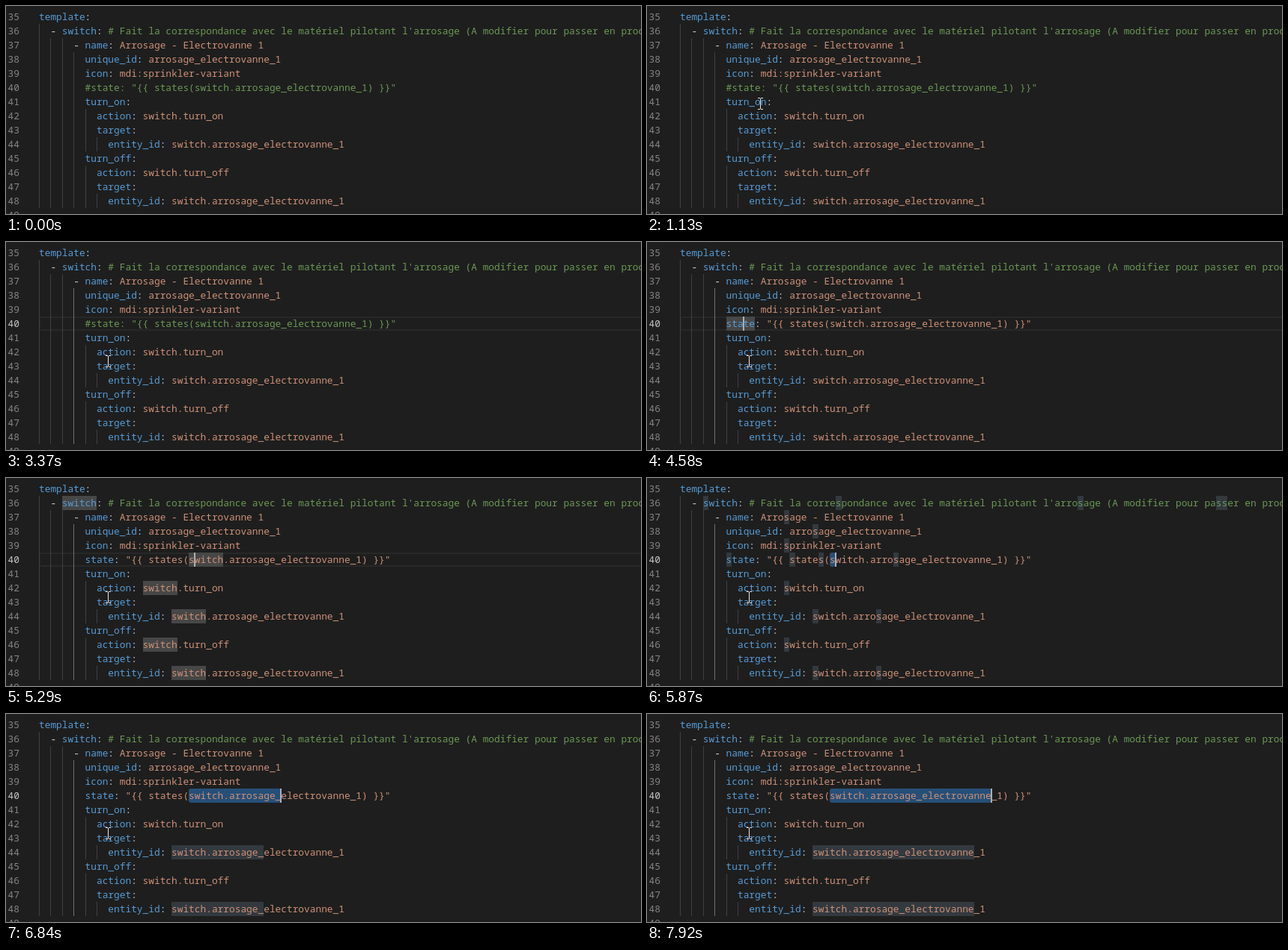
These frames come from a looping animation (848x279 px, 8000 ms). An HTML page with a canvas:

```html
<!DOCTYPE html>
<html lang="fr">
<head>
<meta charset="utf-8">
<title>Editor</title>
<style>
  html, body { margin: 0; width: 100%; height: 100%; overflow: hidden; background: #1e1e1e; }
  canvas { display: block; }
</style>
</head>
<body>
<canvas id="stage" width="848" height="279"></canvas>
<script>
const ctx = document.getElementById('stage').getContext('2d');

const LOOP = 8000, FIRST = 35, ACTIVE = 40;
const LEFT = 44, TOP = 5, ROW = 19, CHAR = 7.697;
const FONT = '12.83px "Noto Sans Mono", "DejaVu Sans Mono", monospace';
const COLOR = {
  bg: '#1e1e1e', key: '#569cd6', text: '#ce9178', comment: '#6a9955', mark: '#d4d4d4',
  number: '#858585', activeNumber: '#c6c6c6', guide: '#404040', activeGuide: '#707070',
  lineBorder: '#282828', word: '#474747', match: '#33393f', selection: '#264f78',
  caret: '#aeafad', mouse: '#e8e8e8'
};

const SOURCE = [
  'template:',
  "  - switch: # Fait la correspondance avec le matériel pilotant l'arrosage (A modifier pour passer en prod)",
  '      - name: Arrosage - Electrovanne 1',
  '        unique_id: arrosage_electrovanne_1',
  '        icon: mdi:sprinkler-variant',
  '        state: "{{ states(switch.arrosage_electrovanne_1) }}"',
  '        turn_on:',
  '          action: switch.turn_on',
  '          target:',
  '            entity_id: switch.arrosage_electrovanne_1',
  '        turn_off:',
  '          action: switch.turn_off',
  '          target:',
  '            entity_id: switch.arrosage_electrovanne_1',
  ''
];
const ACTIVE_ROW = ACTIVE - FIRST;
const ANCHOR = 26;      // column where the selection begins
const REPEAT = 31.25;   // keyboard repeat, ms

const colX = col => LEFT + col * CHAR;
const rowY = row => TOP + row * ROW;
const indentOf = line => line.search(/\S|$/);

// Holds t at the last of `count` evenly spaced captures between a and b.
function sample(t, a, b, count) {
  const step = (b - a) / (count - 1);
  return a + step * Math.min(count - 1, Math.floor((t - a) / step + 1e-6));
}

const repeats = (t, start) => Math.floor((t - start) / REPEAT);

function selectedCount(t) {
  if (t < 5830) return 0;
  if (t < 6380) return 1;
  if (t < 7170) return 2 + repeats(sample(t, 6380, 7000, 16), 6375);
  return 22 + [7170, 7290, 7420, 7540, 7710, 7920].filter(at => t >= at).length;
}

function caretCol(t) {
  if (t < 2900) return 7;
  if (t < 4000) return 8;
  if (t < 4500) return 9;
  if (t < 5330) return 10 + repeats(sample(t, 4500, 5040, 13), 4495);
  return ANCHOR + selectedCount(t);
}

const caretOn = t =>
  t >= 1650 && !(t >= 2190 && t < 2690) && !(t >= 3370 && t < 3580);

function mousePos(t) {
  const glide = (a, b, from, to) => {
    const s = Math.min(b, a + Math.floor((t - a) / 40) * 40);
    const p = 1 - (1 - (s - a) / (b - a)) ** 2;
    return from.map((v, i) => Math.round(v + (to[i] - v) * p));
  };
  if (t < 830) return null;
  if (t < 1790) return glide(830, 1270, [456, 272], [104, 110]);
  return glide(1790, 2110, [104, 110], [136, 160]);
}

function fill(color, x, y, w, h) {
  ctx.fillStyle = color;
  ctx.fillRect(x, y, w, h);
}

function band(color, row, col, length, radius = 0) {
  const x = Math.round(colX(col)), end = Math.round(colX(col + length));
  ctx.fillStyle = color;
  ctx.beginPath();
  ctx.roundRect(x, rowY(row), end - x, ROW, radius);
  ctx.fill();
}

function eachMatch(lines, pattern, visit) {
  lines.forEach((line, row) => {
    for (const m of line.matchAll(pattern)) visit(row, m.index, m[0].length);
  });
}

function drawHighlights(t, lines) {
  const count = selectedCount(t);
  if (count) {
    const picked = lines[ACTIVE_ROW].substr(ANCHOR, count);
    if (t >= 5870) {
      const pattern = new RegExp(picked.replace('.', '\\.'), 'g');
      eachMatch(lines, pattern, (row, col, length) => {
        if (row !== ACTIVE_ROW || col !== ANCHOR) band(COLOR.match, row, col, length);
      });
    }
    band(COLOR.selection, ACTIVE_ROW, ANCHOR, count, 3);
  } else if (t >= 5290) {
    eachMatch(lines, /\bswitch\b/g, (...at) => band(COLOR.word, ...at));
  } else if (t >= 4250 && caretCol(t) <= 13) {
    band(COLOR.word, ACTIVE_ROW, 8, 5);
  }
}

function drawGuides(lines, focused) {
  lines.forEach((line, row) => {
    for (let col = 0; col < indentOf(line); col += 2) {
      const lit = focused && col === 6;
      fill(lit ? COLOR.activeGuide : COLOR.guide, Math.round(colX(col)), rowY(row), 1, ROW);
    }
  });
}

function drawLine(line, row) {
  let col = indentOf(line);
  const put = (text, color) => {
    ctx.fillStyle = color;
    ctx.fillText(text, colX(col), rowY(row) + 14);
    col += text.length;
  };
  const body = line.slice(col);
  if (body.startsWith('#')) return put(body, COLOR.comment);
  const parts = body.match(/^(- )?(\w+)(: ?)(.*)$/);
  if (!parts) return;
  const [, dash, key, colon, value] = parts;
  if (dash) put(dash, COLOR.mark);
  put(key, COLOR.key);
  put(colon, COLOR.mark);
  put(value, value.startsWith('#') ? COLOR.comment : COLOR.text);
}

function drawMouse([x, y]) {
  ctx.fillStyle = COLOR.mouse;
  ctx.fillRect(x, y - 7, 1, 14);
  for (const end of [y - 8, y + 7]) {
    ctx.fillRect(x - 3, end, 3, 1);
    ctx.fillRect(x + 1, end, 3, 1);
  }
}

function draw(t) {
  const focused = t >= 1650;
  const lines = SOURCE.slice();
  if (t < 3580) lines[ACTIVE_ROW] = lines[ACTIVE_ROW].replace('state', '#state');

  fill(COLOR.bg, 0, 0, 848, 279);
  if (focused && !selectedCount(t)) {
    ctx.strokeStyle = COLOR.lineBorder;
    ctx.lineWidth = 2;
    ctx.strokeRect(LEFT + 1, rowY(ACTIVE_ROW) + 1, 848, ROW - 2);
  }
  drawHighlights(t, lines);
  drawGuides(lines, focused);

  ctx.font = FONT;
  lines.forEach((line, row) => {
    const active = focused && row === ACTIVE_ROW;
    ctx.fillStyle = active ? COLOR.activeNumber : COLOR.number;
    ctx.fillText(FIRST + row, 2.6, rowY(row) + 14);
    drawLine(line, row);
  });

  if (caretOn(t)) {
    fill(COLOR.caret, Math.round(colX(caretCol(t))) - 1, rowY(ACTIVE_ROW), 2, ROW);
  }
  const mouse = mousePos(t);
  if (mouse) drawMouse(mouse);
}

const start = performance.now();
function tick() {
  draw((performance.now() - start) % LOOP);
  requestAnimationFrame(tick);
}
tick();
</script>
</body>
</html>
```
